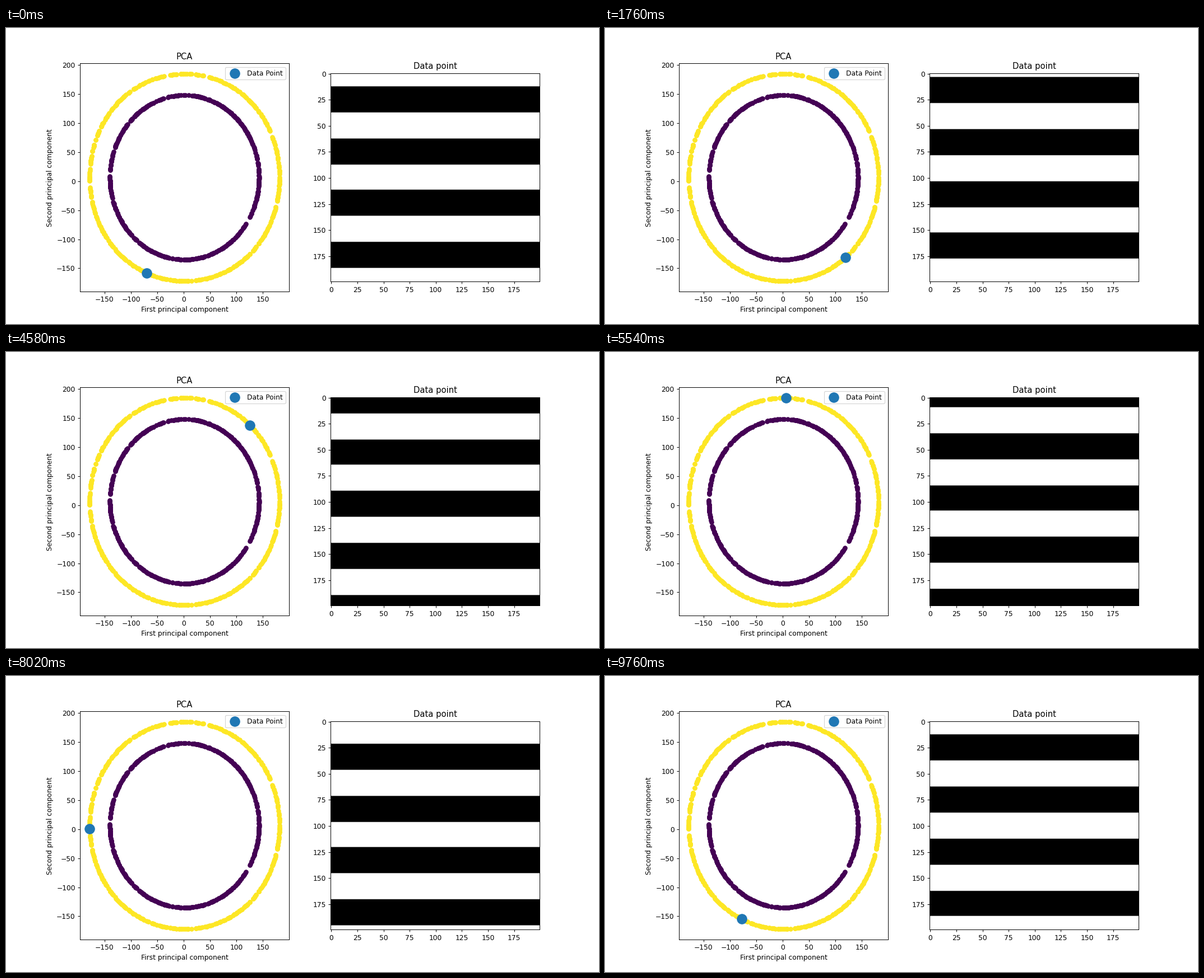
A matplotlib script that plays this animation: 1058 px wide and 529 px high, repeating every 9.82 s.

```python
import numpy as np
import matplotlib.pyplot as plt
from matplotlib.animation import FuncAnimation

FRAMES, INTERVAL = 491, 20
ROWS = 200
POSES = 2 * (ROWS - 1)          # distinct stripe patterns in one turn
START = -113.1                  # ring angle of phase zero, in degrees
rng = np.random.default_rng(4)


def sorted_phases():
    """Random ascending phases in degrees, snapped to the stripe patterns."""
    steps = [0, 50, 100, 252, 303, 454, 490]
    marks = [0, 43, 70.8, 177, 226.2, 335.5, 358.2]
    phases = np.interp(np.arange(FRAMES), steps, marks)
    phases = np.sort(phases + rng.normal(0, 1.8, FRAMES))
    phases = np.clip(phases, 0, marks[-1])
    return np.round(phases * POSES / 360) * 360 / POSES


def ring(degrees, center, radii, bulge=0):
    """Points on an ellipse that bulges a little along its diagonals."""
    t = np.radians(degrees)
    x = center[0] + radii[0] * np.cos(t) - bulge * np.cos(3 * t)
    y = center[1] + radii[1] * np.sin(t) + bulge * np.sin(3 * t)
    return np.column_stack([x, y])


def stripes(phase):
    wave = np.cos(np.linspace(0, 8 * np.pi, ROWS) + np.radians(phase))
    return np.tile(np.sign(wave)[:, None], (1, ROWS))


def show(artists, visible):
    for artist in artists:
        artist.set_visible(visible)


phases = sorted_phases()
path = ring(phases + START, (1.5, 6.3), (180.6, 179.05), bulge=0.77)
inner = ring(rng.uniform(0, 360, 509), (1.35, 6.45), (141.3, 141.5))

fig, (pca, picture) = plt.subplots(1, 2, figsize=(12, 6), dpi=1058 / 12)

rings = [pca.scatter(*inner.T, color="#440154"),
         pca.scatter(*path.T, color="#fde725")]
marker = pca.scatter(*path[:1].T, s=200, color="C0", label="Data Point", zorder=3)
pca.set(title="PCA", xlabel="First principal component",
        ylabel="Second principal component",
        xlim=(-196.4, 199.4), ylim=(-189.8, 202.4))
legend = pca.legend(loc="upper right")

image = picture.imshow(stripes(0), cmap="gray", vmin=-1, vmax=1)
picture.set_title("Data point")

# Paint the unchanging parts once and keep them as a backdrop
static = rings + [part for ax in (pca, picture)
                  for part in (ax.xaxis, ax.yaxis, ax.title, ax.patch)]
live = [marker, image, legend, *pca.spines.values(), *picture.spines.values()]
show(live, False)
fig.canvas.draw()
backdrop = np.array(fig.canvas.buffer_rgba())
show(static, False)
show(live, True)
fig.figimage(backdrop, origin="upper", zorder=-1)


def update(i):
    marker.set_offsets(path[i:i + 1])
    image.set_data(stripes(phases[i]))
    return marker, image


anim = FuncAnimation(fig, update, frames=FRAMES, interval=INTERVAL,
                     repeat=True, repeat_delay=0)
plt.show()
```
